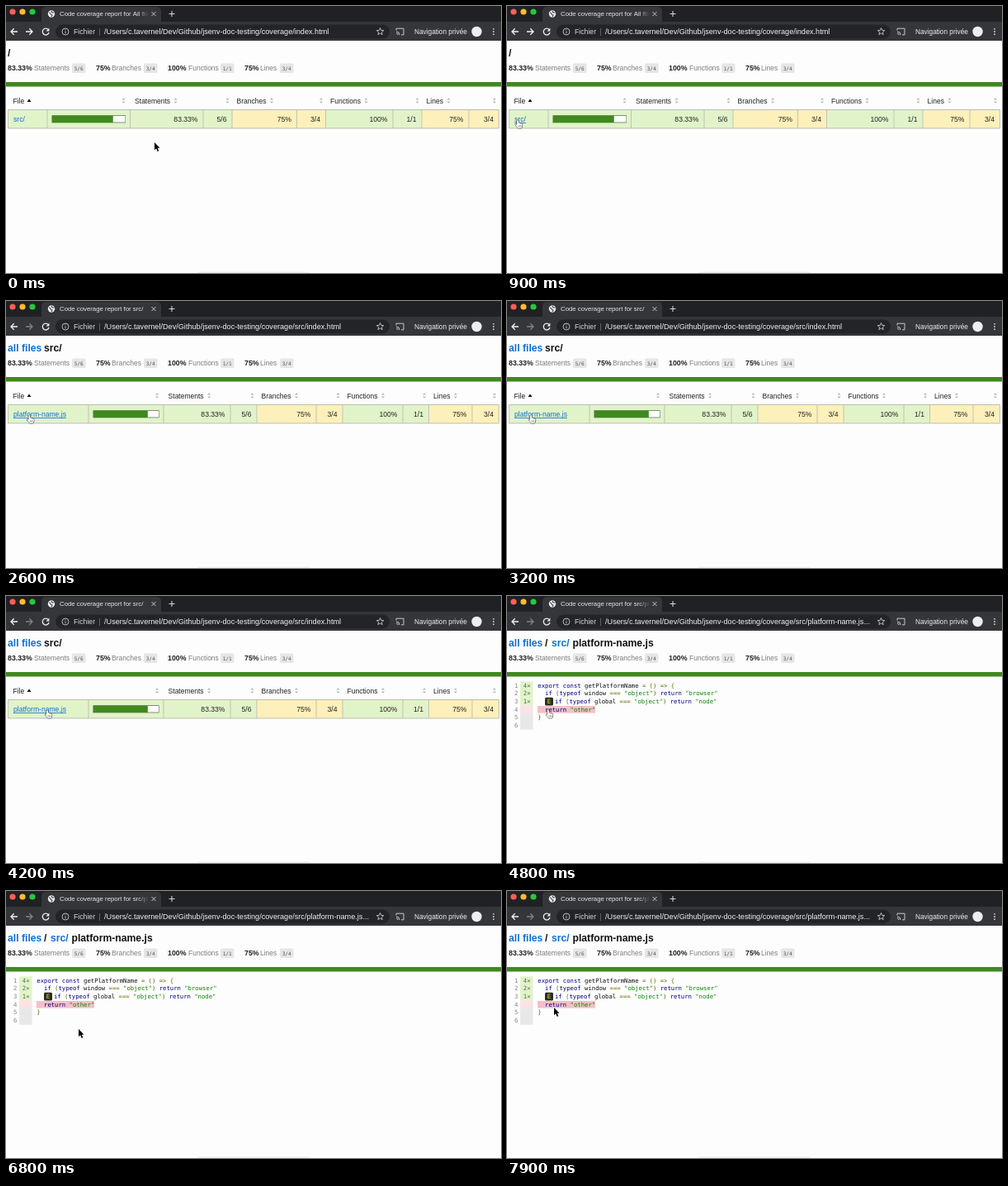
Recreate the animation shown at these times as an HTML page with a canvas. Size 600 by 323 pixels, loop 8000 ms.

```html
<!DOCTYPE html>
<html lang="fr">
<head>
<meta charset="utf-8">
<title>Code coverage</title>
<style>
html, body { margin: 0; width: 100%; height: 100%; overflow: hidden; background: #fdfdfd; }
canvas { display: block; width: 600px; height: 323px; }
</style>
</head>
<body>
<canvas id="stage"></canvas>
<script>
const W = 600, H = 323, LOOP = 8000, STEP = 100;
const canvas = document.getElementById('stage');
const ctx = canvas.getContext('2d');
const dpr = window.devicePixelRatio || 1;
canvas.width = W * dpr;
canvas.height = H * dpr;

const SANS = '"Liberation Sans", Arial, sans-serif';
const MONO = '"DejaVu Sans Mono", Menlo, monospace';
const LINK = '#0f70d2', HIGH = '#e1f3c9', MEDIUM = '#fdf0ba', GREEN = '#40891f';
const BASE = '/Users/c.tavernel/Dev/Github/jsenv-doc-testing/coverage/';

const PAGES = [
  {
    tab: 'All files', url: 'index.html', link: 'src/',
    title: [['/', 2, '#111']],
    cols: [2.5, 50, 150.5, 239, 274, 352.5, 387.5, 469, 504, 561, 597.5]
  },
  {
    tab: 'src/', url: 'src/index.html', link: 'platform-name.js',
    title: [['all files', 2, LINK], ['src/', 46, '#111']],
    cols: [2.5, 100, 191, 272, 304, 376, 408, 481, 512.5, 565, 597.5]
  },
  {
    tab: 'src/platform-name.js', url: 'src/platform-name.js...',
    title: [['all files', 2, LINK], ['/', 46, '#111'], ['src/', 54, LINK], ['platform-name.js', 79.5, '#111']]
  }
];

const STATS = [
  ['83.33%', 'Statements', '5/6', 2, 34, 80],
  ['75%', 'Branches', '3/4', 109, 128, 167],
  ['100%', 'Functions', '1/1', 196, 221, 260],
  ['75%', 'Lines', '3/4', 289, 308, 332]
];

const CODE = [
  'export const getPlatformName = () => {',
  '  if (typeof window === "object") return "browser"',
  'if (typeof global === "object") return "node"',
  '  return "other"',
  '}'
];

// time, x, y of the pointer tip
const PATH = [
  [0, 180, 165], [800, 13, 138], [1900, 13, 138], [2200, 20, 146], [2500, 28, 138],
  [2800, 29, 138], [3500, 29, 138], [4200, 50, 138], [6100, 50, 138],
  [6800, 88, 167], [7300, 84, 165], [7900, 57, 141], [8000, 57, 141]
];

function text(s, x, y, size, color, { font = SANS, bold = false, align = 'left' } = {}) {
  ctx.font = `${bold ? 'bold ' : ''}${size}px ${font}`;
  ctx.textAlign = align;
  ctx.fillStyle = color;
  ctx.fillText(s, x, y);
  return ctx.measureText(s).width;
}

function rect(x, y, w, h, color) {
  ctx.fillStyle = color;
  ctx.fillRect(x, y, w, h);
}

function round(x, y, w, h, r, color) {
  ctx.beginPath();
  ctx.roundRect(x, y, w, h, r);
  ctx.fillStyle = color;
  ctx.fill();
}

function dot(x, y, r, color) {
  ctx.beginPath();
  ctx.arc(x, y, r, 0, Math.PI * 2);
  ctx.fillStyle = color;
  ctx.fill();
}

function poly(points, color) {
  ctx.beginPath();
  points.forEach(([x, y]) => ctx.lineTo(x, y));
  ctx.closePath();
  ctx.fillStyle = color;
  ctx.fill();
}

function stroke(d, color, width = 1) {
  ctx.strokeStyle = color;
  ctx.lineWidth = width;
  ctx.stroke(new Path2D(d));
}

function drawTabs(page) {
  rect(0, 0, W, 20, '#202124');
  ['#ff5f57', '#febc2e', '#28c840'].forEach((c, i) => dot(8 + i * 12, 7, 3.6, c));
  round(43, 1, 145, 20, [5, 5, 0, 0], '#35363a');

  dot(55, 9.5, 4.2, '#eef0f2');
  stroke('M52 8q2 0 2 1.5t2 1.5l-1 2M55 6l1 2 2.5 0', '#45474b', 1.2);

  const fade = ctx.createLinearGradient(160, 0, 173, 0);
  fade.addColorStop(0, '#e6e7e9');
  fade.addColorStop(1, 'rgba(230,231,233,0)');
  ctx.save();
  ctx.beginPath();
  ctx.rect(64, 0, 109, 20);
  ctx.clip();
  const short = page.tab === 'src/';
  text('Code coverage report for ' + page.tab, 65, 12.4, 7.8, short ? '#e6e7e9' : fade);
  ctx.restore();

  stroke('M176.5 7l5 5M181.5 7l-5 5', '#c4c6c9');
  stroke('M201 6v7M197.5 9.5h7', '#d5d6d8', 1.1);
}

function drawToolbar(page, index) {
  rect(0, 19, W, 23, '#35363a');
  stroke('M14 31H6M9.7 27.2L6 31l3.7 3.8', '#f1f2f3', 1.3);
  stroke('M24 31h8M28.3 27.2L32 31l-3.7 3.8', index ? '#808286' : '#f1f2f3', 1.3);
  stroke('M51.2 28.6A3.9 3.9 0 1 0 52 32', '#eceded', 1.3);
  poly([[52.4, 26.6], [52.4, 30.4], [48.6, 30.4]], '#eceded');

  round(60, 22.5, 405, 17, 8.5, '#232427');
  stroke('M76 31a4 4 0 1 0 -8 0a4 4 0 1 0 8 0M72 30.3v3M72 28.3v1', '#c6c8cb', 0.9);
  text('Fichier', 82, 34, 8.7, '#d6d7d9');
  rect(113, 27, 0.8, 9, '#6c6e72');
  text(BASE + page.url, 119, 34, 9.15, '#f0f1f2');

  const star = Array.from({ length: 10 }, (_, i) => {
    const a = -Math.PI / 2 + i * Math.PI / 5, r = i % 2 ? 2 : 4.5;
    return `${453.5 + r * Math.cos(a)} ${31 + r * Math.sin(a)}`;
  });
  stroke('M' + star.join('L') + 'Z', '#c6c8cb', 0.9);
  stroke('M473 29.5v-2.3h9v7.6h-3M473 31a4 4 0 0 1 4 4M473 33a2 2 0 0 1 2 2', '#c6c8cb', 1);
  text('Navigation privée', 495, 34, 8.28, '#eceded');
  dot(570.5, 31, 6.2, '#eceef0');
  [27.8, 31, 34.2].forEach(y => dot(591, y, 0.9, '#d6d7d9'));
}

function drawSummary(page) {
  page.title.forEach(([s, x, c]) => text(s, x, 60.5, 12.2, c, { bold: true }));
  STATS.forEach(([pct, name, part, x1, x2, x3]) => {
    text(pct, x1, 78, 8.8, '#222', { bold: true });
    text(name, x2, 78, 8.5, '#7c7c7c');
    round(x3, 69.5, 16.5, 11.5, 1.8, '#e6e6e6');
    text(part, x3 + 8.2, 77.8, 6.1, '#555', { font: MONO, align: 'center' });
  });
  rect(0, 92, W, 5.5, GREEN);
}

function sorter(x) {
  poly([[x - 2, 113.6], [x, 111.3], [x + 2, 113.6]], '#b4b4b4');
  poly([[x - 2, 115.4], [x, 117.7], [x + 2, 115.4]], '#b4b4b4');
}

function drawTable(page, hover) {
  const c = page.cols, top = 125.5, bottom = 148;
  text('File', 8.5, 117.6, 8.5, '#222');
  poly([[25.5, 116], [28, 112.6], [30.5, 116]], '#111');
  sorter(c[2] - 8);

  rect(c[0], top, c[10] - c[0], bottom - top, HIGH);
  STATS.forEach(([pct, name, part], i) => {
    const left = c[2 + i * 2], mid = c[3 + i * 2], right = c[4 + i * 2];
    const w = text(name, left + 5.6, 117.6, 8.5, '#222');
    sorter(left + 5.6 + w + 6.5);
    sorter(right - 5.5);
    if (i % 2) rect(left, top, right - left, bottom - top, MEDIUM);
    text(pct, mid - 6.5, 140, 8.6, '#222', { align: 'right' });
    text(part, right - 6.5, 140, 8.6, '#222', { align: 'right' });
  });
  c.forEach(x => rect(x - 0.4, top, 0.8, bottom - top, '#b5b8ae'));
  rect(c[0], top - 0.5, c[10] - c[0], 0.9, '#b5b8ae');
  rect(c[0], bottom - 0.5, c[10] - c[0], 0.9, '#b5b8ae');

  const x = c[1] + 6, w = c[2] - c[1] - 12;
  rect(x - 0.5, 132.3, w + 1, 9, '#55684a');
  rect(x, 133, w, 7.6, '#fdfdfd');
  rect(x, 132.6, w * 0.8333, 8.4, GREEN);

  const linkW = text(page.link, 9, 140, 8.6, LINK);
  if (hover) rect(9, 141, linkW, 0.8, LINK);
}

function tokenColor(s) {
  if (s[0] === '"') return '#080';
  if (/^(export|const|if|typeof|return)$/.test(s)) return '#008';
  return /^\w/.test(s) ? '#111' : '#660';
}

function drawCode() {
  const pitch = 9.7, top = 103.4, size = 7.26;
  const fills = [HIGH, HIGH, HIGH, '#fce1e5', '#e8e8e8', '#e8e8e8'];
  const counts = ['4×', '2×', '1×'];
  rect(37, 133, 70, 8.6, '#f5bfc7');
  fills.forEach((fill, i) => {
    const y = top + i * pitch, base = y + 7.2;
    rect(16, y, 15.5, pitch + 0.1, fill);
    text(i + 1, 13.3, base, size, '#858585', { font: MONO, align: 'right' });
    if (counts[i]) text(counts[i], 28.5, base, size, '#5d6b4e', { font: MONO, align: 'right' });
    let x = i === 2 ? 58 : 37.3;
    (CODE[i] || '').match(/"\w+"|\w+|\s+|[^\w\s"]+/g)?.forEach(s => {
      x += text(s, x, base, size, tokenColor(s), { font: MONO });
    });
  });
  round(46, 122.8, 10, 9.8, 1.5, '#2b2e20');
  text('E', 51, 130.4, size, '#e8ee3c', { font: MONO, align: 'center' });
}

function pointerAt(t) {
  const i = PATH.findIndex((p, k) => k && t <= p[0]);
  const [t0, x0, y0] = PATH[i - 1], [t1, x1, y1] = PATH[i];
  const k = (t - t0) / (t1 - t0), e = k * k * (3 - 2 * k);
  return [x0 + (x1 - x0) * e, y0 + (y1 - y0) * e];
}

const ARROW = new Path2D('M0 0V9.2L2.1 7.3L3.7 11L5.3 10.3L3.7 6.7H6.5Z');
const HAND = new Path2D('M-.9.5Q0-.7.9.5V3.6Q1.8 3 2.5 3.9Q3.4 3.3 4 4.3Q5.5 4 5.6 5.2V7Q5.4 8.2 4.5 9.8H.3Q-.8 8.2-2.6 6.2Q-3.2 5-2 5L-.9 6Z');

function drawPointer(t, hand) {
  const [x, y] = pointerAt(t);
  ctx.save();
  ctx.translate(x, y);
  ctx.lineJoin = 'round';
  ctx.lineWidth = hand ? 1 : 1.4;
  ctx.strokeStyle = hand ? '#111' : '#fff';
  ctx.fillStyle = hand ? '#fff' : '#000';
  const shape = hand ? HAND : ARROW;
  ctx.stroke(shape);
  ctx.fill(shape);
  if (hand) stroke('M.9 6.4v2M2.4 6.4v2M3.9 6.4v2', '#333', 0.5);
  ctx.restore();
}

function draw(t) {
  const index = t < 1600 ? 0 : t < 4400 ? 1 : 2;
  const page = PAGES[index];
  const hand = (t >= 800 && t < 2100) || (t >= 2400 && t < 6200);
  ctx.setTransform(dpr, 0, 0, dpr, 0, 0);
  rect(0, 0, W, H, '#fdfdfd');
  drawTabs(page);
  drawToolbar(page, index);
  drawSummary(page);
  if (page.cols) drawTable(page, hand && (index === 0 || t >= 2400));
  else drawCode();
  round(232, 321.5, 136, 4, 2, '#efefef');
  drawPointer(t, hand);
}

const start = performance.now();
function tick() {
  const t = (performance.now() - start) % LOOP;
  draw(Math.floor(t / STEP) * STEP);
  requestAnimationFrame(tick);
}
tick();
</script>
</body>
</html>
```
